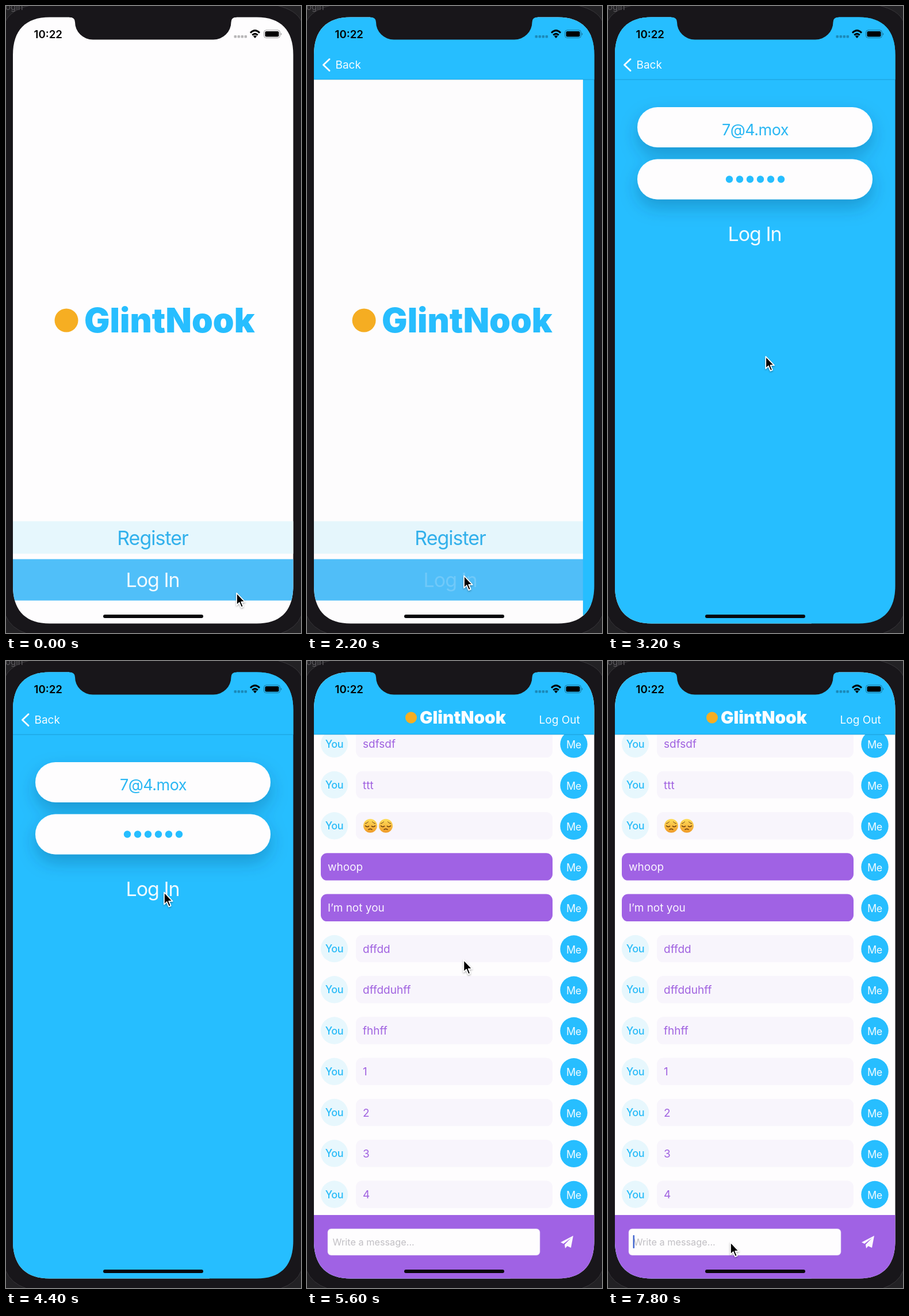
An HTML page that plays this animation: 513 px wide and 1091 px high, repeating every 8 s.

```html
<!DOCTYPE html>
<html lang="en">
<head>
<meta charset="utf-8">
<title>Chat app demo</title>
<style>
  html, body { margin: 0; width: 100%; height: 100%; overflow: hidden; background: #18161a; }
  svg { display: block; width: 100vw; height: 100vh; }
  text { font-family: Inter, Roboto, sans-serif; font-size: 19px; }
  .brand { font-weight: 900; }
  .button { font-size: 34px; letter-spacing: -.03em; text-anchor: middle; }
  .avatar { font-size: 18px; letter-spacing: -.02em; text-anchor: middle; }
</style>
</head>
<body>
<svg viewBox="0 0 513 1091" preserveAspectRatio="none">
  <defs>
    <clipPath id="screen">
      <path d="M12 85C12 42 34 19.500 76 19.500H436C478 19.500 499.500 42 499.500 85V1009C499.500 1052 478 1074.500 436 1074.500H76C34 1074.500 12 1052 12 1009Z"/>
    </clipPath>
    <filter id="shadow" x="-20%" y="-50%" width="140%" height="240%">
      <feDropShadow dx="0" dy="14" stdDeviation="15" flood-color="#003a60" flood-opacity=".28"/>
    </filter>
    <filter id="soft" x="-50%" y="-50%" width="200%" height="200%">
      <feDropShadow dx="0" dy="1.500" stdDeviation="1.500" flood-opacity=".35"/>
    </filter>
    <linearGradient id="face" x2="0" y2="1">
      <stop stop-color="#ffdf5c"/><stop offset="1" stop-color="#ef9a28"/>
    </linearGradient>
    <g id="pensive">
      <circle r="12" fill="url(#face)"/>
      <g fill="none" stroke="#6b3f10" stroke-width="1.500" stroke-linecap="round">
        <path d="M-8.500 0q3 3 6 .5M8.500 0q-3 3-6 .5M-3 6.500q3-2 6 0"/>
        <path d="M-8.500-4q3-.5 5-3M8.500-4q-3-.5-5-3" stroke-width="1"/>
      </g>
    </g>
  </defs>

  <rect width="513" height="1091" fill="#18161a"/>
  <g fill="#222124" stroke="#38363a">
    <path d="M-1 27Q8 7 42-1H-1ZM514 27Q505 7 471-1H514ZM-1 1060Q8 1083 36 1092H-1ZM514 1060Q505 1083 477 1092H514Z"/>
  </g>
  <text x="-1" y="7" fill="#5c5a5e" style="font-size:15px">ogin</text>

  <g clip-path="url(#screen)">
    <g id="welcome">
      <rect x="12" y="19" width="488" height="1056" fill="#fefdfe"/>
      <circle cx="105" cy="547" r="20.500" fill="#f6ae22"/>
      <text class="brand" x="136" y="568" fill="#27beff" style="font-size:59px">GlintNook</text>
      <rect x="12" y="896.500" width="488" height="56.500" fill="#e6f7fd"/>
      <text class="button" x="255" y="938" fill="#32b1ec">Register</text>
      <rect x="12" y="962.500" width="488" height="72" fill="#50bff9"/>
      <text class="button" id="welcomeLogin" x="255" y="1011" fill="#f1faff">Log In</text>
      <rect id="welcomeDim" x="12" y="19" width="488" height="1056"/>
    </g>

    <g id="login">
      <rect x="12" y="19" width="488" height="1056" fill="#26beff"/>
      <g fill="#fefdfe" filter="url(#shadow)">
        <rect x="51" y="176" width="409" height="70" rx="35"/>
        <rect x="51" y="266.500" width="409" height="70" rx="35"/>
      </g>
      <text x="256" y="224.500" fill="#2ab7f3" text-anchor="middle" style="font-size:27px;letter-spacing:-.02em">7@4.mox</text>
      <g id="password" fill="#26beff"></g>
      <text class="button" id="formLogin" x="255" y="408.500" fill="#f1faff">Log In</text>
      <rect id="loginDim" x="12" y="19" width="488" height="1056"/>
    </g>

    <g id="chat">
      <rect x="12" y="19" width="488" height="1056" fill="#fefdfe"/>
      <g id="messages"></g>
      <rect x="12" y="964" width="488" height="111" fill="#a062e4"/>
      <rect x="36" y="988" width="369" height="46" rx="6" fill="#fefdfe" stroke="#d9c8ee" stroke-width=".6"/>
      <text x="44.500" y="1017" fill="#c1bfc4" style="font-size:16.300px">Write a message...</text>
      <rect id="caret" x="43.500" y="999" width="2.500" height="23" rx="1" fill="#4468cf"/>
      <path d="M463 1000L459 1021 452.500 1018 449 1022 448 1015.500 459 1004 446 1014 441 1011.500Z" fill="#fbf7ff"/>
    </g>

    <g id="nav">
      <rect x="12" y="19" width="488" height="109" fill="#26beff"/>
      <rect x="12" y="127.500" width="488" height="1" fill="#00507c" opacity=".3"/>
      <g id="back" fill="#f7fcff">
        <path d="M39 92.500L28.500 102.500 39 112.500" fill="none" stroke="#f7fcff" stroke-width="3" stroke-linecap="round" stroke-linejoin="round"/>
        <text x="49.500" y="109">Back</text>
      </g>
      <g id="title" fill="#fefdfe">
        <circle cx="181" cy="98.500" r="10" fill="#f6ae22"/>
        <text class="brand" x="196" y="109" style="font-size:29.800px">GlintNook</text>
      </g>
      <text id="logout" x="403.500" y="109" fill="#f7fcff">Log Out</text>
    </g>

    <text x="48.500" y="55.500" font-weight="600" style="font-size:18.700px">10:22</text>
    <g id="signal" opacity=".27"></g>
    <path d="M425 46.700Q433 38.700 441 46.700M428.300 50.600Q433 46 437.700 50.600" fill="none" stroke="#000" stroke-width="3"/>
    <path d="M430 52.700Q433 50 436 52.700L433 56Z"/>
    <rect x="448.500" y="42" width="28" height="13.500" rx="4" fill="none" stroke="#000" stroke-opacity=".4"/>
    <rect x="450.500" y="44" width="24" height="9.500" rx="2.300"/>
    <path d="M478 46.500q2.500 2.300 0 4.500z" opacity=".45"/>
    <rect x="169" y="1059" width="174" height="6" rx="3" fill="#08080b"/>
  </g>

  <path d="M110 18V19.500Q120 19.500 120 28A31 30.500 0 0 0 151 58.500H360.500A31 30.500 0 0 0 391.500 28Q391.500 19.500 401 19.500V18Z" fill="#18161a"/>

  <g id="cursor" filter="url(#soft)">
    <path d="M1 1.500V22.500L5.700 18 9.200 26.300 12.600 24.900 9.200 16.800H15.600Z" stroke="#fff" stroke-width="1.700" stroke-linejoin="round"/>
  </g>
</svg>

<script>
const LOOP = 8000, STEP = 200, WIDTH = 487.5;
const PUSH_LOGIN = 2183, PUSH_CHAT = 4427, LOADED = 5200, FOCUSED = 7400;
const $ = id => document.getElementById(id);
const show = (id, on) => $(id).setAttribute('display', on ? 'inline' : 'none');
const move = (id, x, y = 0) => $(id).setAttribute('transform', `translate(${x} ${y})`);
const fade = (id, alpha) => $(id).setAttribute('opacity', alpha);
const repeat = (count, draw) => Array.from({ length: count }, (_, i) => draw(i)).join('');

$('password').innerHTML = repeat(6, i => `<circle cx="${211 + 18 * i}" cy="301.5" r="6.2"/>`);
$('signal').innerHTML = repeat(4, i => `<rect x="${396.5 + 6 * i}" y="51" width="4.5" height="4.5" rx="1"/>`);

const rows = ['sdfsdf', 'ttt', '', '>whoop', '>I’m not you', 'dffdd', 'dffdduhff', 'fhhff', '1', '2', '3', '4'];
$('messages').innerHTML = rows.map((row, i) => {
  const y = 144.3 + 71.25 * i, mine = row[0] === '>';
  const left = mine ? 24 : 85;
  const body = row
    ? `<text x="${left + 12}" y="${y + 7}" fill="${mine ? '#faf5ff' : '#a062e0'}">${row.replace('>', '')}</text>`
    : `<use href="#pensive" x="110" y="${y}"/><use href="#pensive" x="137" y="${y}"/>`;
  const you = mine ? '' : `<circle cx="47.5" cy="${y}" r="23.7" fill="#e7f7fd"/>
    <text class="avatar" x="47.5" y="${y + 6.5}" fill="#2bbcf8" font-weight="500">You</text>`;
  return `<rect x="${left}" y="${y - 23.7}" width="${427 - left}" height="47.5" rx="11" fill="${mine ? '#a062e4' : '#f8f5fc'}"/>
    ${body}${you}<circle cx="464" cy="${y + .5}" r="23.7" fill="#27beff"/>
    <text class="avatar" x="464" y="${y + 8}" fill="#f3fbff">Me</text>`;
}).join('');

// Critically damped spring, 0 to 1.
function push(ms) {
  const x = Math.max(0, ms) * 0.0185;
  return 1 - (1 + x) * Math.exp(-x);
}

// time, x, y of the pointer tip
const pointer = [
  [0, 400, 1020], [200, 400, 1020], [1600, 272, 990], [2600, 272, 990], [3600, 274, 401],
  [5200, 274, 401], [6400, 264, 855], [7200, 212, 1010], [LOOP, 212, 1010]
];
function pointerAt(t) {
  const i = pointer.findIndex(p => p[0] > t);
  const [t0, x0, y0] = pointer[i - 1], [t1, x1, y1] = pointer[i];
  const u = (t - t0) / (t1 - t0), e = u * u * (3 - 2 * u);
  return [x0 + (x1 - x0) * e, y0 + (y1 - y0) * e];
}

function draw(t) {
  const toLogin = push(t - PUSH_LOGIN), toChat = push(t - PUSH_CHAT);
  const onLogin = t >= PUSH_LOGIN, onChat = t >= PUSH_CHAT;
  show('welcome', !onChat);
  show('login', onLogin);
  show('nav', onLogin);
  show('chat', onChat);
  move('welcome', -0.3 * WIDTH * toLogin);
  move('login', WIDTH * (1 - toLogin) - 0.3 * WIDTH * toChat);
  move('chat', WIDTH * (1 - toChat));
  fade('welcomeDim', 0.1 * toLogin);
  fade('loginDim', 0.1 * toChat);
  fade('welcomeLogin', t >= 2000 ? 0.2 : 1);
  fade('formLogin', t === 3800 ? 0.2 : 1);

  const settled = toChat > 0.97;
  fade('back', settled ? 0 : Math.max(0, 1 - 1.5 * toChat));
  for (const id of ['title', 'logout']) {
    fade(id, settled ? 1 : toChat);
    move(id, settled ? 0 : 200 * (1 - toChat));
  }
  show('messages', t >= LOADED);
  show('caret', t >= FOCUSED);
  move('cursor', ...pointerAt(t));
}

const start = performance.now();
function tick() {
  const t = (performance.now() - start) % LOOP;
  draw(Math.floor(t / STEP) * STEP);
  requestAnimationFrame(tick);
}
tick();
</script>
</body>
</html>
```
